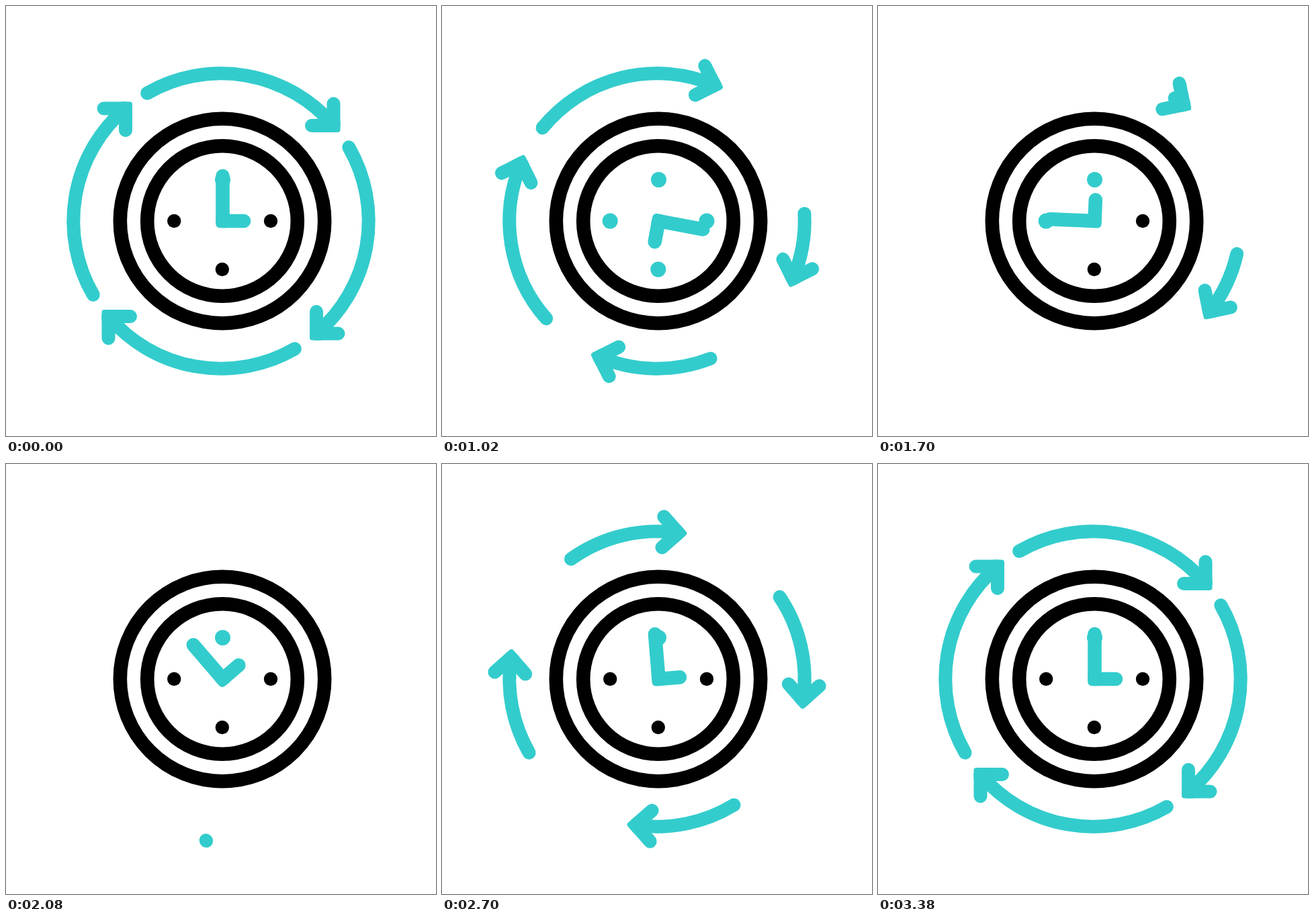
Write an HTML page with a canvas that moves like this. It is 640x640 px and loops after 3600 ms.

```html
<!DOCTYPE html>
<html>
<head>
<meta charset="utf-8">
<style>
html, body { margin: 0; width: 100%; height: 100%; overflow: hidden; background: #fff; }
canvas { display: block; }
</style>
</head>
<body>
<canvas id="stage" width="640" height="640"></canvas>
<script>
const ctx = document.getElementById('stage').getContext('2d');
const TEAL = '#33cccc', RAD = Math.PI / 180;
const LOOP = 3600, STEP = 20, START = 160;
const clamp = v => Math.max(0, Math.min(1, v));

// Arrow geometry, relative to the ring centre
const RADIUS = 219.7, TAIL = -30, TIP = 49.7, ARM = 32.5;
const HEAD = [[167.5, -174.5], [167.5, -142], [135, -142]];
const LINE = (TIP - TAIL) * RAD * RADIUS;
const LENGTH = LINE + 2 * ARM;

// Each arrow is erased from its tail, then drawn back from its head
const arrows = [
  { out: 160, span: 1232, back: 2170, head: HEAD },
  { out: 350, span: 1240, back: 2190, head: [...HEAD].reverse() },
  { out: 610, span: 1270, back: 2215, head: [...HEAD].reverse() },
  { out: 790, span: 1292, back: 2230, head: [...HEAD].reverse() }
];
const BACK_SPAN = 1160, POWER = 1.63;

const dots = [
  { x: 322.5, y: 258.5, at: 360 },
  { x: 394, y: 320, at: 90 },
  { x: 321.8, y: 392, at: 180 },
  { x: 250.2, y: 320, at: 270 }
];

function bezierEase(p, x1, x2) {
  let lo = 0, hi = 1;
  for (let i = 0; i < 30; i++) {
    const s = (lo + hi) / 2, r = 1 - s;
    if (3 * s * r * r * x1 + 3 * s * s * r * x2 + s * s * s < p) lo = s; else hi = s;
  }
  return lo * lo * (3 - 2 * lo);
}

function circle(x, y, r) {
  ctx.beginPath();
  ctx.arc(x, y, r, 0, 2 * Math.PI);
}

function polyline(points) {
  ctx.beginPath();
  points.forEach(([x, y]) => ctx.lineTo(x, y));
  ctx.stroke();
}

// Softly rounded outer corner
function corner([x, y], size, r) {
  ctx.beginPath();
  ctx.roundRect(x - size / 2, y - size / 2, size, size, r);
  ctx.fill();
}

function hiddenPart(t, { out, span, back }) {
  return t < back
    ? clamp((t - out) / span) ** POWER
    : (1 - clamp((t - back) / BACK_SPAN)) ** POWER;
}

function drawArrow(t, arrow) {
  const hidden = hiddenPart(t, arrow) * LENGTH;
  if (hidden >= LENGTH) return;
  if (hidden < LINE) {
    const from = TAIL * RAD + hidden / RADIUS;
    ctx.beginPath();
    ctx.arc(0, 0, RADIUS, from - Math.PI / 2, (TIP - 90) * RAD);
    ctx.stroke();
  }
  const skip = Math.max(0, hidden - LINE) / ARM;
  const i = Math.floor(skip), k = skip - i;
  const [a, b] = [arrow.head[i], arrow.head[i + 1]];
  const first = [a[0] + (b[0] - a[0]) * k, a[1] + (b[1] - a[1]) * k];
  polyline([first, ...arrow.head.slice(i + 1)]);
  if (i === 0) corner(arrow.head[1], 20, 4);
}

function drawClock(angle) {
  ctx.strokeStyle = '#000';
  ctx.lineWidth = 20.6;
  for (const r of [152.2, 111.8]) {
    circle(322, 320, r);
    ctx.stroke();
  }
  // A dot lights up when the long hand passes and goes out a turn later
  for (const { x, y, at } of dots) {
    const lit = [at - 360, at].some(a => angle >= a && angle < a + (a === at ? 378 : 18) && a >= 0);
    ctx.fillStyle = lit ? TEAL : '#000';
    circle(x, y, lit ? 11.5 : 10.2);
    ctx.fill();
  }
  ctx.save();
  ctx.translate(322.5, 320);
  ctx.rotate(angle * RAD);
  ctx.strokeStyle = ctx.fillStyle = TEAL;
  polyline([[0, -67], [0, 0], [31.5, 0]]);
  ctx.scale(-1, 1);
  corner([0, 0], 20.6, 6);
  ctx.restore();
}

function draw(t) {
  ctx.fillStyle = '#fff';
  ctx.fillRect(0, 0, 640, 640);
  ctx.lineCap = ctx.lineJoin = 'round';

  drawClock(720 * bezierEase(clamp((t - START) / 2900), 0.173, 0.0835));

  const p = clamp((t - START) / 3220);
  const turn = 360 * p * p * (3 - 2 * p);
  ctx.strokeStyle = ctx.fillStyle = TEAL;
  ctx.lineWidth = 20;
  arrows.forEach((arrow, i) => {
    ctx.save();
    ctx.translate(320, 320);
    ctx.rotate((turn + 90 * i) * RAD);
    drawArrow(t, arrow);
    ctx.restore();
  });
}

const begin = performance.now();
function tick() {
  const t = (performance.now() - begin) % LOOP;
  draw(Math.floor(t / STEP) * STEP);
  requestAnimationFrame(tick);
}
tick();
</script>
</body>
</html>
```
